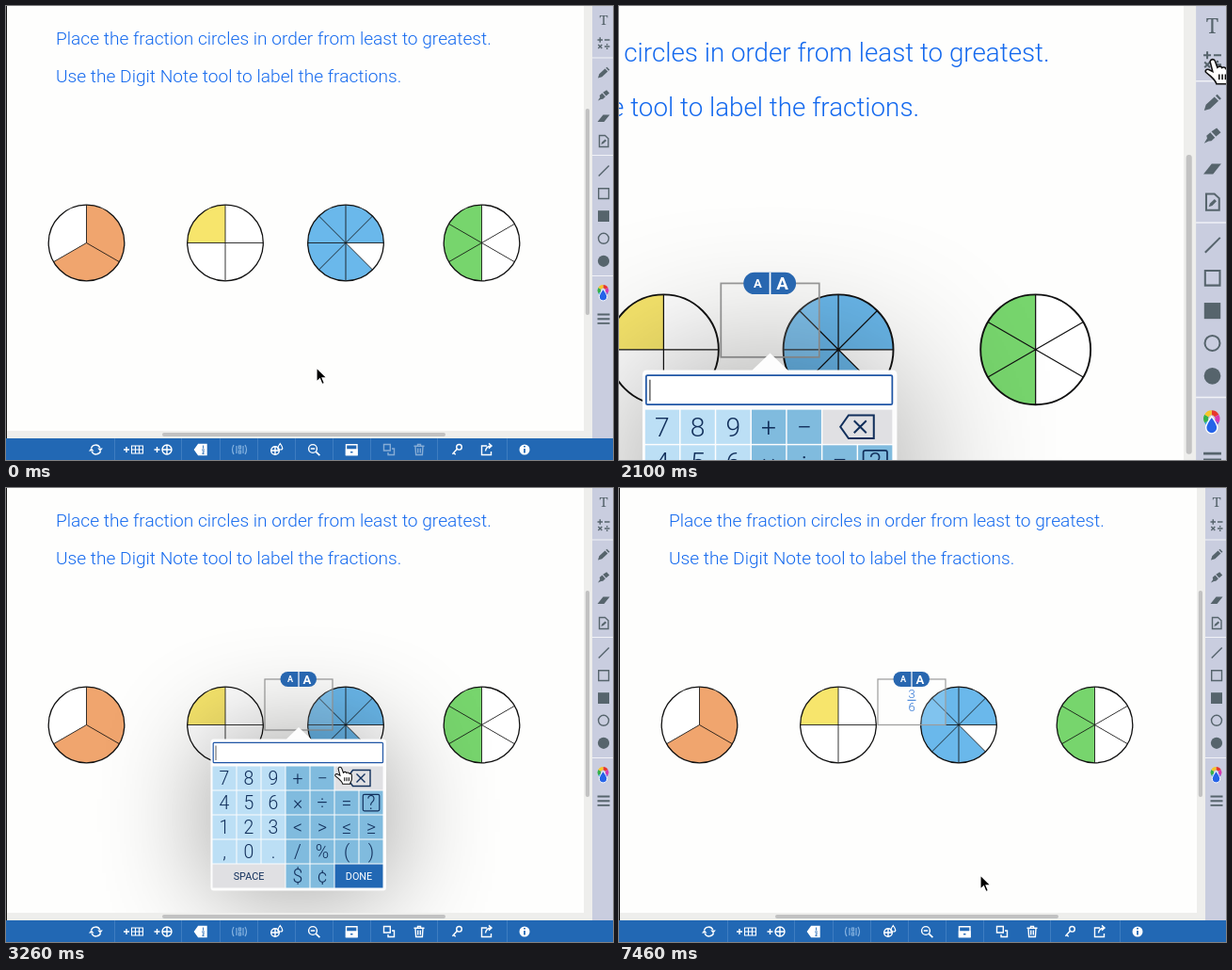
Animation of 645 by 482 pixels, one loop 8.13 s. Source, as an HTML page:

```html
<!DOCTYPE html>
<html lang="en">
<head>
<meta charset="utf-8">
<title>Fraction circles</title>
<style>
html, body { margin: 0; height: 100%; overflow: hidden; background: #fefefd; }
svg { display: block; width: 100vw; height: 100vh; font-family: Roboto, sans-serif; }
.task { font-size: 19.15px; font-weight: 300; fill: #1469ee; }
.label { fill: #2a72d4; text-anchor: middle; font-weight: 300; }
.key { fill: #12305c; text-anchor: middle; font-size: 19.5px; font-weight: 300; }
.word { font-size: 10.8px; font-weight: 400; }
.pill { fill: #fff; text-anchor: middle; font-weight: 700; }
.line { fill: none; stroke-width: 1.4; }
</style>
</head>
<body>
<svg viewBox="0 0 645 482">
<defs>
  <filter id="blur" filterUnits="userSpaceOnUse" x="0" y="0" width="645" height="620">
    <feGaussianBlur stdDeviation="58"/>
  </filter>
</defs>
<g id="stage">
  <rect width="645" height="482" fill="#fefefd"/>
  <text class="task" x="53" y="41">Place the fraction circles in order from least to greatest.</text>
  <text class="task" x="53" y="81">Use the Digit Note tool to label the fractions.</text>
  <g id="pies"></g>

  <g id="note">
    <rect id="frame" x="275" y="203" width="72" height="54" fill="#fff" fill-opacity=".15" stroke="#9b9b9b" stroke-width="1.2"/>
    <text id="single" class="label" x="311" y="228" font-size="18.5">3</text>
    <g id="fraction">
      <text class="label" x="311" y="222.5" font-size="13">3</text>
      <path d="M306.500 225.300h9" stroke="#2a72d4"/>
      <text id="den" class="label" x="311" y="236.500" font-size="13">6</text>
    </g>
  </g>

  <g id="popup">
    <rect x="218" y="267" width="186" height="161" opacity=".4" filter="url(#blur)"/>
    <path d="M221 266.500h77l13-12.500 13 12.500h76.500q3.500 0 3.500 3.500v154q0 3.500-3.500 3.500H221q-3.500 0-3.500-3.500V270q0-3.500 3.500-3.500z" fill="#fdfdfd"/>
    <rect x="220.200" y="270.300" width="180.300" height="21.400" rx="1" fill="#fff" stroke="#1f55a5" stroke-width="1.200"/>
    <text id="typed" x="222.500" y="286.800" font-family="Liberation Sans, sans-serif" font-size="17" fill="#111"></text>
    <path id="caret" d="M0 273.500v15.500" stroke="#333" stroke-width=".8"/>
    <g id="keys"></g>
    <g class="line" stroke="#12305c">
      <path d="M362.500 308l6-8.500h18.500v17h-18.500zM372.500 303.500l9 9m0-9l-9 9"/>
      <rect x="379.300" y="325.300" width="17.500" height="17.500" rx="1.500" stroke-width="1.200"/>
    </g>
  </g>

  <g id="sizer">
    <rect x="291.500" y="195" width="38.500" height="16" rx="8" fill="#2867b0"/>
    <path d="M311 195v16" stroke="#fff" stroke-width="1.200"/>
    <text class="pill" x="302" y="206.300" font-size="9">A</text>
    <text class="pill" x="320" y="207.500" font-size="13">A</text>
  </g>

  <!-- scroll bars and tool bars -->
  <path d="M614 0h9v459H0v-8h614z" fill="#eeeeec"/>
  <rect x="615.800" y="109" width="4.200" height="219" rx="2" fill="#c2c2c2"/>
  <rect x="166" y="453" width="301" height="4" rx="2" fill="#c2c2c2"/>
  <path d="M.5 0v459" stroke="#111"/>
  <rect x="623" width="22" height="459" fill="#c9cddf"/>
  <path d="M623 55h22m-22 103.500h22m-22 128h22" stroke="#f1f2f7"/>
  <g fill="#56646c" stroke="#56646c" stroke-width="0">
    <text x="635" y="20" text-anchor="middle" font-family="Noto Serif, serif" font-size="15">T</text>
    <path class="line" d="M628.500 36h5.500m-2.750-2.750v5.500M636 36h5.500M629.300 41l4 4m0-4l-4 4M636 43h5.500"/>
    <circle cx="638.700" cy="40.800" r=".9"/><circle cx="638.700" cy="45.200" r=".9"/>
    <path d="M629 76.500l1.300-4.300 6.200-5.700 3 3-6.200 5.800zM637.400 65.700l1.200-1 2.900 3-1.200 1z"/>
    <path d="M629 100.500l2.200-3.600-.5-2 2.800-2.300 3.400 3.700-2.600 2.500-2 .2zM634.300 91.800l3.900-2.600 3 3.300-3.500 3z"/>
    <path d="M628.500 123l6-7.500h7l-6 7.500z"/>
    <path class="line" stroke-width="1.200" d="M630.500 137.500h6l3.500 3.200v8.800h-9.500z"/>
    <path d="M632.300 147l1-2.600 3.300-3 1.500 1.500-3.200 3.200z"/>
    <path class="line" d="M629.700 180.500l11-11M629.700 193.700h10.800v10.800h-10.800z"/>
    <path d="M629 217.200h12v11.800h-12z"/>
    <circle class="line" cx="635" cy="246.800" r="5.500"/>
    <circle cx="635" cy="270.800" r="6.100"/>
    <path class="line" style="stroke-width:1.900" d="M628.500 327.500h13m-13 4.700h13m-13 4.700h13"/>
  </g>
  <g id="wheel"></g>
  <path d="M634.500 300.500q4.200 5.500 4.200 8.200a4.200 4.200 0 0 1-8.400 0q0-2.700 4.200-8.200z" fill="#2563e8" stroke="#fff"/>

  <rect y="459" width="645" height="23" fill="#2268b4"/>
  <path d="M115.500 459v23m71-23v23m41-23v23m40-23v23m40-23v23m40-23v23m40-23v23m71-23v23m74-23v23" stroke="#4683c4" stroke-width=".8"/>
  <g class="line" stroke="#fff">
    <path d="M90.500 469.500a5 5 0 0 1 9.300-.5M100.500 472.500a5 5 0 0 1-9.300.5"/>
    <path d="M97.300 469.500h5.600l-2.800 3.200zM87.900 472.500h5.600l-2.800-3.200z" fill="#fff" stroke="none"/>
    <path d="M125 471h6m-3-3v6m29.500-3h6m-3-3v6"/>
    <path d="M133.500 467h12v8h-12zm4 0v8m4-8v8m-8-4h12" stroke-width="1.100"/>
    <path d="M166 471a5 5 0 0 1 10 0a5 5 0 0 1-10 0h10m-5-5v10"/>
    <path d="M213 465.500v11h-8.500l-4-5.500 4-5.500z" fill="#fff"/>
    <path d="M209.500 466.500v3.300m-1.500 1.300h3m-2.300 1.800h1.800l-1.800 2.500h2" stroke="#2268b4" stroke-width=".9"/>
    <path d="M242 466q-3 5 0 10m12-10q3 5 0 10M245 467v8m2.500-8h2v3h-2zm0 5h2v3h-2zm4.500-5v8" stroke="#86b3e0" stroke-width="1.200"/>
    <circle cx="286" cy="472" r="4.300"/><path d="M281.700 472h8.600m-4.300-4.300v8.600"/>
    <path d="M291.300 464.500q5 6.500 0 6.500t0-6.500z" stroke-width="1.200"/>
    <circle cx="326" cy="470" r="4.400"/><path d="M323.800 470h4.400m1.200 3.400l4 3.800" stroke-width="1.700"/>
    <path d="M361.500 465.800h11.500v10.700h-11.500z"/>
    <path d="M361.500 471h11.500v5.500h-11.500z" fill="#fff"/><path d="M366 473.700h2.500" stroke="#2268b4"/>
    <g id="edit">
      <path d="M401.500 465.500h6.800v6.500h-6.800zM410 470h2.500v6.500h-6.500V474"/>
      <path d="M433.500 467.200h11m-7-.2v-1.600h3v1.600m-5.500.5l.6 9h6.800l.6-9M437.700 469.500v5m2.600-5v5"/>
    </g>
    <circle cx="481.500" cy="468.300" r="2.800"/><path d="M479.400 470.300l-5 5.500m1.300-1.300l2 1.800"/>
    <path d="M511 467h-5.500v9.500h10V473M509.500 472.500q.5-5 6-5.500m-2.500-2.600l3 2.600-3 2.700"/>
    <circle cx="551" cy="471" r="5.500" fill="#fff" stroke="none"/>
    <path d="M551 470v4.500m0-7.500v1.600" stroke="#2268b4" stroke-width="1.800"/>
  </g>

  <g id="cursor">
    <path id="arrow" d="M0 0V15l3.500-3.200 2.400 5.700 2.500-1-2.400-5.600h4.900z" stroke="#fff" stroke-width="1.100"/>
    <path id="hand" d="M-1.700 1.600C-1-.5 1.400-.4 2 1.400L3.700 6C5 4.800 6.500 5 7 6.200 8.500 5.400 9.600 6 10 7 11.600 6.600 12.600 7.500 12.600 9V13C12.400 15 11 16 10.800 18H3C2.600 16 .5 14-1.200 12.400L-4.600 9.600C-5.600 8.400-4.400 6.800-2.600 7.600L.2 9ZM5 11v4m2.300-4v4m2.300-4v4" fill="#fff" stroke="#111" stroke-width="1.100"/>
  </g>
</g>
</svg>
<script>
const LOOP = 8130;
const $ = id => document.getElementById(id);
const show = (id, on) => $(id).style.display = on ? '' : 'none';

// Angles in degrees, clockwise from the top
const polar = (x, y, r, deg) => {
  const a = deg * Math.PI / 180;
  return `${x + r * Math.sin(a)} ${y - r * Math.cos(a)}`;
};
const arc = (x, y, r, a, b) =>
  `${polar(x, y, r, a)}A${r} ${r} 0 ${b - a > 180 ? 1 : 0} 1 ${polar(x, y, r, b)}`;

function pie(x, parts, from, to, color) {
  const y = 251.5, r = 40.3;
  let cuts = '';
  for (let i = 0; i < parts; i++) cuts += `M${x} ${y}L${polar(x, y, r, i * 360 / parts)}`;
  return `<circle cx="${x}" cy="${y}" r="${r}" fill="#fff"/>
    <path d="M${x} ${y}L${arc(x, y, r, from, to)}z" fill="${color}"/>
    <path d="${cuts}" stroke="#111" stroke-width=".85"/>
    <circle cx="${x}" cy="${y}" r="${r}" fill="none" stroke="#111" stroke-width="1.3"/>`;
}
$('pies').innerHTML = pie(85.5, 3, 0, 240, '#f0a56e') + pie(233, 4, 270, 360, '#f7e56c')
  + pie(361, 8, 135, 450, '#6ab8eb') + pie(505.5, 6, 180, 360, '#77d56d');

$('wheel').innerHTML = ['#e8372c', '#d63ab0', '#7a3fd0', '#2aa9e0', '#35b24a', '#f6c62b']
  .map((c, i) => `<path d="M${arc(634.5, 302, 4.3, i * 60, i * 60 + 60)}" fill="none" stroke="${c}" stroke-width="3.4"/>`)
  .join('');

function key(text, col, row, span, color, style = '') {
  const x = 219.5 + 26 * col, y = 295.5 + 26 * row, w = 26 * span - 1;
  const dy = style ? 16.3 : 19.3;
  return `<rect x="${x}" y="${y}" width="${w}" height="25" fill="${color}"/>
    <text class="key ${style}" x="${x + w / 2}" y="${y + dy}">${text}</text>`;
}
let keys = '';
['789+−', '456×÷=?', '123<>≤≥', ',0./%()'].forEach((line, row) =>
  [...line].forEach((c, col) =>
    keys += key(c === '<' ? '&lt;' : c, col, row, 1, col < 3 ? '#bcdff5' : '#80bbde')));
keys += key('', 5, 0, 2, '#e0e0e3') + key('SPACE', 0, 4, 3, '#e0e0e3', 'word')
  + key('$', 3, 4, 1, '#80bbde') + key('¢', 4, 4, 1, '#80bbde')
  + key('<tspan fill="#fff">DONE</tspan>', 5, 4, 2, '#2268b4', 'word');
$('keys').innerHTML = keys;

const ramp = (t, a, b) => Math.min(1, Math.max(0, (t - a) / (b - a)));
const ease = (t, a, b) => (1 - Math.cos(Math.PI * ramp(t, a, b))) / 2;

// Pointer moves: start, end, x, y
const moves = [
  [260, 1090, 635, 39], [2400, 3630, 282, 363], [4000, 4560, 305, 390],
  [4830, 5430, 283, 338], [5730, 6530, 380, 409], [6880, 6881, 383.5, 410.5],
  [7459, 7460, 384, 411]
];
const OPEN = 1450, THREE = 3900, SLASH = 4730, SIX = 5470;

function draw(t) {
  const zoom = 1 + .5 * (ease(t, 260, 1294) - ease(t, 1908, 2855));
  $('stage').setAttribute('transform', `translate(${645 * (1 - zoom)} 0) scale(${zoom})`);

  let x = 330, y = 384;
  for (const [a, b, mx, my] of moves) {
    const k = ease(t, a, b);
    x += (mx - x) * k;
    y += (my - y) * k;
  }
  $('cursor').setAttribute('transform', `translate(${x} ${y})`);
  const hand = t > 1130 && t < 2300 || t > 3170 && t < 6880;
  show('hand', hand);
  show('arrow', !hand);

  const appear = ramp(t, OPEN, 1630);
  $('note').style.opacity = $('sizer').style.opacity = appear;
  $('edit').style.opacity = .45 + .55 * appear;
  const visible = appear * (1 - ramp(t, 6770, 6960));
  show('popup', visible > 0);
  $('popup').style.opacity = visible;

  const stacked = t >= SLASH;
  $('popup').setAttribute('transform', `translate(0 ${stacked ? -4.7 : 0})`);
  $('frame').setAttribute('height', stacked ? 48.5 : 54);
  show('single', t >= THREE && !stacked);
  show('fraction', stacked);
  show('den', t >= SIX);

  const text = '3/6'.slice(0, (t >= THREE) + stacked + (t >= SIX));
  if ($('typed').textContent !== text) $('typed').textContent = text;
  const width = text && visible ? $('typed').getComputedTextLength() : 0;
  $('caret').setAttribute('transform', `translate(${223 + width} 0)`);
  const since = t - [SIX, SLASH, THREE, 950].find(s => t >= s || s === 950);
  show('caret', since % 1060 < 530);
}

const start = performance.now();
function tick() {
  draw((performance.now() - start) % LOOP);
  requestAnimationFrame(tick);
}
tick();
</script>
</body>
</html>
```
